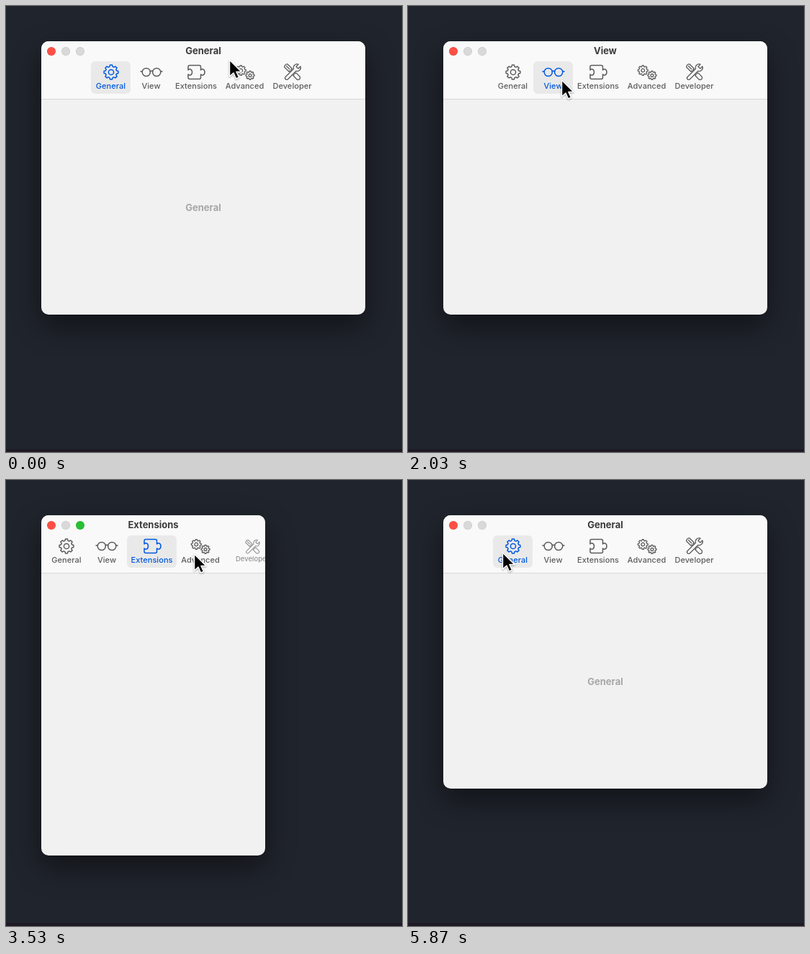
Recreate the animation shown at these times as an HTML page. Size 550 by 620 pixels, loop 7210 ms.

```html
<!DOCTYPE html>
<html lang="en">
<head>
<meta charset="utf-8">
<style>
  html, body { margin: 0; width: 100%; height: 100%; overflow: hidden; }
  body { position: relative; background: linear-gradient(#20242c 616px, #1e1925 616px); font: 700 13px/16px Inter, sans-serif; }
  #win { position: absolute; left: 49px; top: 49px; overflow: hidden; border-radius: 10px; background: #f1f1f1;
    box-shadow: 0 0 1px rgba(0, 0, 0, .6), 0 16px 40px rgba(0, 0, 0, .48); }
  #bar { position: absolute; inset: 0 0 auto; height: 81px; box-sizing: border-box; background: #f9f9f9; border-bottom: 1px solid #d8d8d8; }
  #title { position: absolute; inset: 5px 0 auto; text-align: center; color: #3a3a3a; }
  .light { position: absolute; top: 8px; width: 12px; height: 12px; border-radius: 50%; background: #d9d9d9; box-shadow: inset 0 0 0 .5px rgba(0, 0, 0, .12); }
  .tab { position: absolute; top: 28px; height: 45px; border-radius: 6px; color: #5c5c5c; text-align: center; font-weight: 500; font-size: 11px; letter-spacing: .05px; }
  .tab svg { position: absolute; left: 50%; top: 0; margin-left: -18px; overflow: visible; }
  .tab span { position: absolute; inset: 26px -9px auto; }
  .hover { background: #e8e8e8; }
  .press { background: #d9d9d9; color: #1c1c1c; }
  .on { background: #e9e9e9; color: #0059de; }
  #more { position: absolute; right: 11px; top: 36px; }
  #body { position: absolute; inset: 81px 0 0; display: flex; align-items: center; justify-content: center; white-space: pre; color: #a7a7a7; }
  svg { fill: none; stroke: currentColor; stroke-width: 1.5; stroke-linejoin: round; stroke-linecap: round; }
  #cursor { position: absolute; left: 0; top: 0; overflow: visible; fill: #000; stroke: #fff; filter: drop-shadow(0 1px 1px rgba(0, 0, 0, .35)); }
</style>
</head>
<body>
<div id="win">
  <div id="bar">
    <i class="light" style="left:8px;background:#fe4f45"></i>
    <i class="light" style="left:28px"></i>
    <i class="light" style="left:48px" id="zoom"></i>
    <div id="title"></div>
    <svg id="more" width="14" height="14" color="#6a6a6a"><path d="M2 2l5 5-5 5M8 2l5 5-5 5"/></svg>
  </div>
  <div id="body"></div>
</div>
<svg id="cursor" width="20" height="30"><path d="M1.5 2V25L7 20 10.5 28 14.5 26.2 11 18.5H18Z"/></svg>
<script>
const LOOP = 7210, RESIZE = 195, LABEL_DELAY = 235, TABS_WIDTH = 312;
const $ = id => document.getElementById(id);
const clamp = v => Math.min(1, Math.max(0, v));
const mix = (a, b, k) => a + (b - a) * k;
const ease = k => (1 - Math.cos(Math.PI * clamp(k))) / 2;

function gear(x, y, outer, inner, hole) {
  const points = [];
  for (let i = 0; i < 8; i++)
    for (const [offset, r] of [[-.34, inner], [-.2, outer], [.2, outer], [.34, inner]]) {
      const a = (i + offset) * Math.PI / 4;
      points.push(`${(x + r * Math.sin(a)).toFixed(2)},${(y - r * Math.cos(a)).toFixed(2)}`);
    }
  return `<polygon points="${points.join(' ')}"/><circle cx="${x}" cy="${y}" r="${hole}"/>`;
}

const tabs = [
  { name: 'General', x: 0, w: 55, size: [450, 380], icon: gear(0, 0, 10, 7.9, 3.6) },
  { name: 'View', x: 56, w: 55, size: [450, 280],
    icon: '<circle cx="-7.2" r="5.6"/><circle cx="7.2" r="5.6"/><path d="M-1.8-1Q0-2.4 1.8-1M-12.8-1H-15M12.8-1H15"/>' },
  { name: 'Extensions', x: 111.5, w: 69, size: [300, 480], label: 'Extensions\n(Resizable)', resizable: true,
    icon: '<path d="M-11-3V-7.5Q-11-9.5-9-9.5H4.5Q6.5-9.5 6.5-7.5V-3C8-5 12-4.500 12 0S8 5 6.500 3V7.500Q6.500 9.500 4.500 9.500H-9Q-11 9.500-11 7.500V3C-9.500 5-5.500 4.500-5.500 0S-9.500-5-11-3Z"/>' },
  { name: 'Advanced', x: 181, w: 65,
    icon: `<g stroke-width="1.3">${gear(-5.7, -2.5, 7, 5.4, 2.3)}${gear(7, 4.4, 6, 4.6, 1.9)}</g>` },
  { name: 'Developer', x: 246, w: 67,
    icon: `<g stroke-width="1.3" fill="#f9f9f9">
      <path transform="rotate(-45)" d="M-3-13Q0-15.500 3-13V-4H1V4H2.800V12Q0 15.500-2.800 12V4H-1V-4H-3ZM0-12V-6"/>
      <path transform="rotate(45)" d="M-2-13.500A5 5 0 0 0-2.300-4.500V11.500a2.300 2.300 0 0 0 4.600 0V-4.500A5 5 0 0 0 2-13.500V-9H-2Z"/></g>` }
];
for (const tab of tabs) {
  tab.el = document.createElement('div');
  tab.el.style.width = tab.w + 'px';
  tab.el.innerHTML = `<svg width="36" height="30" viewBox="-18 -15 36 30">${tab.icon}</svg><span>${tab.name}</span>`;
  $('bar').append(tab.el);
}
const [general, view, extensions, , developer] = tabs;

const clicks = [
  { down: -2000, up: -2000, tab: general },
  { down: 300, up: 430, tab: view },
  { down: 1230, up: 1360, tab: general },
  { down: 1830, up: 2030, tab: view },
  { down: 2530, up: 2670, tab: general },
  { down: 3200, up: 3370, tab: extensions },
  { down: 4565, up: 4830, tab: view },
  { down: 5425, up: 5630, tab: general }
];

// Pointer stops: time, x, y
const stops = [
  [25, 309, 73], [290, 212, 103], [720, 212, 103], [1150, 151, 101], [1590, 151, 101], [1820, 212, 101],
  [2260, 212, 101], [2520, 148, 101], [2900, 148, 101], [3190, 260, 101], [3620, 260, 101],
  [4090, 140, 104], [4480, 130, 99], [LOOP, 130, 99]
];

function pointer(t) {
  const i = Math.max(1, stops.findIndex(s => s[0] >= t));
  const [t0, x0, y0] = stops[i - 1], [t1, x1, y1] = stops[i];
  const k = ease((t - t0) / (t1 - t0));
  return [mix(x0, x1, k), mix(y0, y1, k)];
}

function draw(t) {
  const current = clicks.findLastIndex(c => c.up <= t);
  const { up, tab: active } = clicks[current];
  const from = clicks[Math.max(0, current - 1)].tab.size;
  const age = t - up, k = ease(age / RESIZE);
  const [w, h] = active.size.map((v, i) => Math.round(mix(from[i], v, k)));
  const [x, y] = pointer(t);
  const pressed = clicks.find(c => c.down <= t && t < c.up)?.tab;
  const left = Math.max(7.5, (w - TABS_WIDTH) / 2);

  $('win').style.width = w + 'px';
  $('win').style.height = h + 'px';
  $('title').textContent = active.name;
  $('body').textContent = age >= LABEL_DELAY ? active.label || active.name : '';
  $('zoom').style.background = active.resizable ? '#26c033' : '';

  for (const tab of tabs) {
    const px = x + 1 - 49 - left - tab.x;
    const over = age > RESIZE && px >= 0 && px < tab.w && y >= 77 && y < 122;
    const state = tab === active ? 'on' : tab === pressed ? 'press' : over ? 'hover' : '';
    tab.el.className = 'tab ' + state;
    tab.el.style.left = left + tab.x + 'px';
  }

  // The last tab shrinks away into the overflow chevron
  const shown = clamp((w - 300) / 17);
  developer.el.style.opacity = shown;
  developer.el.style.transform = shown < 1 ? `translateX(${16 * (1 - shown)}px) scale(${.6 + .4 * shown})` : '';
  $('more').style.opacity = shown ? 0 : 1;
  $('cursor').style.transform = `translate(${x}px, ${y}px)`;
}

function tick() {
  draw(performance.now() % LOOP);
  requestAnimationFrame(tick);
}
tick();
</script>
</body>
</html>
```
